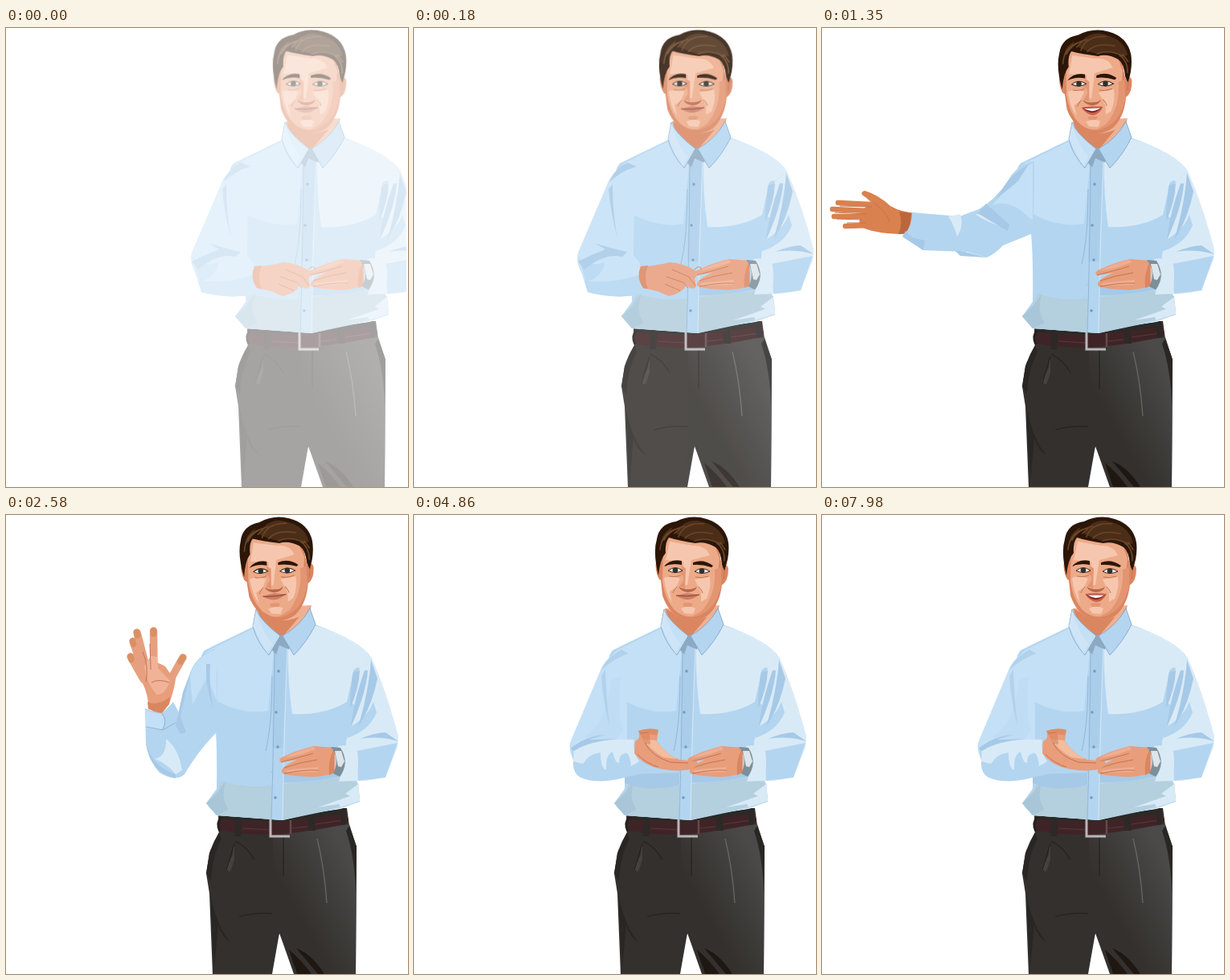
Write an HTML page that moves like this. It is 500 px wide and 570 px high and loops after 8 s.

```html
<!DOCTYPE html>
<html lang="en">
<head>
<meta charset="utf-8">
<title>Presenter</title>
<style>
  html, body { margin: 0; width: 100%; height: 100%; overflow: hidden; background: #fff; }
  svg { display: block; width: 500px; height: 570px; clip-path: inset(0 2px 0 0); }
  .base { fill: #b3d5f0; }
  .soft { fill: #c4e0f6; }
  .pale { fill: #d9eaf7; }
  .fold { fill: #a6c9e7; }
  .skin { fill: #e89d7b; }
  .shade { fill: #da8661; }
  .glow { fill: #f6c7ae; }
  .hair { fill: #2b1608; }
  .lock { fill: none; stroke: #6b4527; stroke-width: 1.6; stroke-linecap: round; }
  .crease { fill: none; stroke: #c47553; stroke-width: 1; }
  .seam { fill: none; stroke: #8db3d3; stroke-width: .9; }
  .finger { fill: none; stroke: #e6a080; stroke-width: 9.5; stroke-linecap: round; }
</style>
</head>
<body>
<svg viewBox="0 0 500 570">
<defs>
  <linearGradient id="cloth" x1="0" y1="1" x2="1" y2="0">
    <stop offset=".35" stop-color="#33302d"/><stop offset=".85" stop-color="#4b4a48"/>
  </linearGradient>
</defs>
<g id="man">
  <g id="trousers">
    <path fill="#34302e" d="M264 374L330 378 424 364 427 386 436 412 435 570 358 570 340 519 331 570 257 570 253 470 249 445 253 420Q257 407 265 394Z"/>
    <path fill="url(#cloth)" d="M332 397L427 384 436 412 435 570 394 570 362 540 354 553 340 519 331 550Z"/>
    <path fill="#1f1712" d="M352 540Q367 552 380 570L362 570ZM361 538Q380 545 396 570L388 570Z"/>
    <path fill="#292623" d="M254 470Q262 512 280 531Q267 524 264 508L259 565ZM427 386L436 412 435 470Q434 425 423 392ZM265 394L268 402Q256 425 255 455L249 445 253 420Z"/>
    <path fill="#45413f" d="M284 406L282 422 273 440 279 443 284 428Z"/>
    <path fill="none" stroke="#211e1c" d="M285 405Q300 412 309 428M345 399L345 448M290 499Q310 493 331 495M284 408L274 441"/>
    <path fill="none" stroke="#696765" stroke-width="1.3" d="M387 402Q396 438 399 482"/>
    <path fill="#3f2427" d="M265 376Q300 382 330 380L421 371Q428 376 424 383Q385 393 331 397Q290 397 264 391Z"/>
    <path fill="none" stroke="#5b3838" d="M294 389L328 391M355 389L375 387M385 384L420 379"/>
    <path fill="#2c2927" d="M264 373L330 378 424 364 423 371Q370 378 330 381L266 378ZM286 376h8l-2 23h-8ZM375 370h8l2 22h-8ZM415 365l7-1 1 20-6 1Z"/>
    <path fill="none" stroke="#242120" stroke-width="3" d="M268 375Q261 382 266 393"/>
    <path fill="none" stroke="#b9b6bb" stroke-width="3" d="M329 378V399H353"/>
    <path fill="none" stroke="#64494a" stroke-width="2.5" d="M354 396V379"/>
  </g>

  <g id="shirt">
    <path class="base" d="M309 138L247 168Q235 182 250 208Q264 235 262 340L249 358 262 373 344 379 420 363 440 356 437 333 425 290 455 178Q440 156 384 136L343 158Z"/>
    <path class="soft" d="M309 140L252 168Q238 182 250 205L262 231Q296 249 326 243L333 172Z"/>
    <path class="pale" d="M384 137Q441 155 455 178L440 190Q431 187 430 205L424 232Q396 249 356 247Q350 205 351 165Z"/>
    <path fill="#b4cfdd" d="M268 330Q298 340 330 336L412 327 438 333 440 352 400 366 344 379 262 373 249 358 262 345Z"/>
    <path fill="#a9c6d8" d="M262 345L274 330Q266 352 277 366L262 373 249 358Z"/>
    <path class="fold" d="M329 318L412 320 414 325Q375 333 340 332Z"/>
    <path class="pale" d="M438 334L422 346 428 349 388 363 414 359 416 363 440 355Z"/>
    <path class="base" d="M334 168L350 164Q346 250 344 379L330 378Q332 270 334 168Z"/>
    <path class="fold" d="M334 165L350 162 344 290 331 290Z" opacity=".6"/>
    <path class="seam" d="M334 167Q333 290 330 378M331 200Q331 260 323 293"/>
    <path d="M350 166Q346 260 344 379" fill="none" stroke="#d5e7f6"/>
    <g fill="#6c9bc1"><circle cx="339" cy="194" r="1.7"/><circle cx="336" cy="245" r="1.7"/><circle cx="338" cy="288" r="1.7"/><circle cx="335" cy="351" r="1.7"/></g>
    <path class="pale" d="M455 178Q474 221 488 275L487 288 472 325Q455 331 434 330L423 287 422 260 440 190Z"/>
    <path class="base" d="M436 293L487 283 472 326 438 330ZM422 286L421 262 425 230 434 236 430 262Q450 250 457 232L461 245Q452 268 424 277Z"/>
    <path class="fold" d="M432 195L440 193Q439 216 428 240Q428 215 432 195ZM446 193L450 193Q448 222 429 263Q432 232 446 193ZM454 180L462 203Q455 238 438 263Q451 220 454 180ZM440 278Q460 270 472 270L488 281Q464 274 440 278Z"/>
    <path class="pale" d="M413 287Q427 284 437 294Q440 318 434 330L414 331 416 325Q426 308 413 287Z"/>
    <path fill="#eeb092" d="M312 116L380 112 375 130 342 154 318 136Z"/>
    <path class="shade" d="M312 116L320 120Q340 138 365 126L350 144 342 153 320 136ZM379 113L375 131 366 136Z"/>
    <path fill="#8da9c1" d="M342 148L329 165 336 173 340 162 352 167 355 160Z"/>
    <path class="soft" stroke="#86a9c8" stroke-width=".9" d="M311 117Q316 131 341 150L327 174Q312 158 307 138Z"/>
    <path class="base" stroke="#86a9c8" stroke-width=".9" d="M378 116L385 136Q374 158 358 174L344 150Q367 137 378 116Z"/>
    <path class="pale" d="M311 118L307 138 325 171 331 160Q316 142 311 118Z" opacity=".55"/>
  </g>

  <g id="watchHand">
    <path class="skin" d="M409 289L383 287Q364 291 343 301Q338 304 342 307L362 304Q345 311 343 317Q342 321 347 322Q366 326 386 325Q399 324 409 320Z"/>
    <path fill="#efae90" d="M383 288Q364 292 344 302L365 298 385 291ZM347 317Q370 314 389 313L388 319 350 320Z"/>
    <path class="crease" d="M342 307Q365 301 382 296M346 314Q365 307 387 304M346 321Q370 316 389 317"/>
    <path class="shade" d="M408 290Q400 305 402 323L408 320Z"/>
    <path fill="#7d8f99" d="M404 288L416 289Q428 308 415 325L407 321Q416 303 404 288Z"/>
    <path fill="#dde5e9" d="M409 293L417 293 421 306 417 313 413 312Z"/>
  </g>

  <g id="armClasp">
    <path class="soft" d="M256 167Q237 178 231 195L195 279Q192 292 199 303L207 328Q240 337 273 331L272 292 264 282 265 205Z"/>
    <path class="base" d="M196 285Q210 298 228 291Q225 310 205 315ZM273 331Q240 337 207 328L203 314Q240 318 273 306Z"/>
    <path class="fold" d="M256 167Q240 175 234 192Q247 178 268 172ZM195 290Q213 281 229 275L216 267Q233 273 256 278L250 284Q228 279 203 300ZM233 200Q235 225 244 262Q238 230 238 194Z"/>
    <path class="skin" d="M273 296Q290 296 309 291Q326 292 341 301Q346 306 340 311L342 321Q337 327 330 319Q325 329 308 333Q292 325 276 323Q267 310 273 296Z"/>
    <path class="shade" d="M273 296L282 295Q276 309 282 324L276 323Q267 310 273 296Z"/>
    <path class="crease" d="M312 300L333 309 341 320M305 309L326 316 332 323M303 318L322 326M340 300Q346 293 349 300"/>
  </g>

  <g id="armPoint">
    <path fill="#d9814f" d="M118 230Q99 229 85 221Q70 207 53 202Q45 205 54 210L62 217 48 227 46 246Q64 255 97 256L116 255Z"/>
    <path class="finger" style="stroke:#d9814f;stroke-width:6.5" d="M60 219L20 217M57 227L13 225M57 234L15 234M60 245L29 246"/>
    <path class="crease" d="M62 222L22 221M55 231L16 229M50 238L18 237M55 242L31 242M64 217Q80 228 84 240"/>
    <path fill="#bc663c" d="M111 230L96 228Q101 242 95 256L108 255Z"/>
    <path class="base" d="M264 165Q240 172 231 190Q215 214 195 225L171 234 112 229Q112 248 100 259L126 276 180 278 205 285Q216 280 225 270L262 255 264 200Z"/>
    <path class="soft" d="M262 168Q246 174 240 186L212 220Q235 212 258 236L262 238Z"/>
    <path class="pale" d="M157 234L172 231Q177 245 168 259Q164 244 157 234ZM190 231L203 232 222 246Q207 242 190 231Z"/>
    <path class="fold" d="M104 252L112 260 128 264 126 276 100 259ZM165 276L178 278 205 285 172 283ZM204 218L233 244 231 252Q210 240 194 230ZM231 190Q240 180 258 168L244 190 216 213Z"/>
  </g>

  <g id="armWave">
    <path class="skin" d="M177 240Q178 224 168 205L168 184Q184 179 198 188L205 198 212 196Q210 216 203 234L192 250Z"/>
    <path class="base" d="M260 166Q238 175 231 191L215 245 208 232Q198 243 194 246Q183 245 173 240L174 285Q180 309 191 320Q211 332 222 322Q241 290 262 270L263 200Z"/>
    <path class="soft" d="M261 167Q235 176 229 200L232 235 250 202 262 230V190ZM174 242Q184 247 193 247Q200 255 194 266L174 264Z"/>
    <path class="pale" d="M199 278Q215 290 219 317L211 322Q200 308 185 303Q200 300 199 278Z"/>
    <path class="fold" d="M231 191Q223 220 217 250L224 270 217 272 211 262 220 220ZM249 185Q248 215 258 240Q252 215 254 185ZM174 283Q182 313 211 322L211 327Q179 320 174 283Z"/>
    <path class="seam" d="M194 246Q201 255 195 267L174 263M195 267L211 258"/>
    <path class="finger" d="M184 192L183.500 144M175 192L163 146M172 197L158 157M171 204L155 176"/>
    <path class="finger" d="M202 209L220 177"/>
    <path class="finger" style="stroke:#d99063;stroke-width:7.500" d="M183.500 143.500v4M162.500 145.500l1 4M157.500 156.500l1 4M155 175.500l1 4M220 177l-3 5"/>
    <path fill="#f0b398" d="M172 188L180 175 188 176 189 190 204 206Q198 224 187 223Q176 211 172 188Z"/>
    <path class="shade" d="M176 232Q188 238 204 226L203 235 193 246 177 241Z"/>
    <path class="crease" d="M179 160L180 192M170 170Q178 188 174 207M181 208Q190 203 203 208"/>
  </g>

  <g id="armRest">
    <path class="fold" d="M262 322L330 320V335Q294 345 262 333Z"/>
    <path class="soft" d="M258 166Q237 178 231 195L194 283Q192 293 200 308L250 312 265 285 265 205Z"/>
    <path class="base" d="M257 200Q252 240 260 268L250 280 212 276Q238 260 246 205Z" opacity=".4"/>
    <path class="fold" d="M258 167Q238 178 233 193Q247 179 267 172ZM233 200Q234 225 243 261Q239 225 238 192Z" opacity=".6"/>
    <g id="forearm">
      <path class="base" d="M195 289Q216 274 255 281L275 278Q272 300 296 314L293 319 262 326Q228 335 207 326Q197 320 198 305Z"/>
      <path class="pale" d="M199 290Q225 276 274 279Q271 293 280 306L270 312Q268 293 262 296Q255 297 255 308Q250 308 247 294Q238 297 239 317Q232 314 232 295Q218 296 210 309L198 306Z"/>
      <path class="fold" d="M195 290Q212 275 237 273L217 279 255 278Q217 281 199 293Z"/>
      <path class="skin" d="M275 281Q283 277 279 268Q295 263 304 267L302 281Q315 299 331 304L352 306Q355 311 344 316Q322 320 298 313Q282 307 274 296Z"/>
      <path fill="#f3bd9e" d="M285 278L301 280Q313 296 327 303L310 301Q293 291 285 278Z"/>
      <path class="shade" d="M279 268Q293 264 304 267L302 273 293 272 294 285 288 284Z" opacity=".7"/>
      <path class="crease" d="M281 271L291 270M287 283Q296 300 319 307L341 308M278 297Q289 309 304 313"/>
    </g>
  </g>

  <g id="head">
    <path class="shade" d="M306 55Q299 56 301 68Q303 80 307 81L309 100Q317 123 336 130Q351 134 365 125Q380 112 383 87Q391 82 391 67Q390 60 383 64L378 34 318 25Z"/>
    <path fill="#edaa89" d="M310 45L309 82Q312 105 324 118Q341 133 359 121Q372 107 377 82L380 54 374 37 318 27Z"/>
    <path class="glow" d="M318 33L347 38Q362 37 368 50L345 56 340 87 335 87 335 58 313 56ZM311 78Q321 74 331 79L326 90 318 95 321 109Q313 98 311 78ZM349 80L368 77Q370 90 364 104L357 108 357 96ZM332 116Q342 111 350 116L347 123 336 122Z"/>
    <path fill="#e39572" d="M374 68Q376 98 358 119L344 127Q374 124 382 88L382 65ZM333 63L330 73Q336 74 335 81L330 89 337 91 338 66ZM334 110Q341 108 347 110L345 114 336 114Z"/>
    <path fill="#b9684a" d="M329 89Q335 93 341 92Q347 93 352 89Q350 95 341 96Q332 95 329 89Z"/>
    <path class="crease" d="M327 89Q323 93 322 97M354 89Q358 93 359 97M387 66L385 79M317 76Q325 78 332 75M350 77Q358 79 366 76"/>
    <path class="hair" d="M304 75Q297 47 302 30Q305 11 326 8Q345-1 364 5Q387 12 391 34Q393 51 386 69L383 62Q382 45 375 40Q362 32 350 35Q330 32 317 28Q312 35 313 47Q306 55 304 75Z"/>
    <path fill="#4b2e17" d="M326 23Q334 6 352 7Q382 12 387 35L380 37Q368 27 350 32Q338 30 326 23ZM307 36Q308 22 322 15L313 29Z"/>
    <path class="lock" d="M306 43Q308 22 327 17M311 31Q318 18 337 14M329 27Q336 9 360 11M337 29Q346 18 371 23M349 32Q364 27 381 36M376 34Q387 42 386 57M381 34L387 43M324 23L332 15"/>
    <g id="brows" class="hair">
      <path d="M311 64Q319 54 333 57L333 62Q321 59 311 64Z"/><path d="M347 62L347 59Q360 54 372 63L370 65Q358 61 347 62Z"/>
    </g>
    <g id="eyes">
      <path fill="#f0ece6" stroke="#3d261b" d="M316 69Q325 62 334 69Q325 74 316 69ZM349 70Q358 63 368 70Q358 75 349 70Z"/>
      <g fill="#30302c"><circle cx="325" cy="68.500" r="3.300"/><circle cx="358" cy="69.500" r="3.300"/></g>
    </g>
    <path id="lids" class="shade" stroke="#3d261b" d="M317 70Q325 64 333 70Q325 73 317 70ZM350 71Q358 65 367 71Q358 74 350 71Z"/>
    <g id="closed">
      <path fill="#cd7d66" d="M326 100Q334 98 340 97Q347 98 355 99Q347 105 340 105Q333 105 326 100Z"/>
      <path fill="none" stroke="#8a4234" d="M326 100Q340 102 355 99"/>
    </g>
    <g id="open">
      <path fill="#c9614d" d="M327 98Q335 97 340 97Q347 97 354 98Q349 108 341 108Q333 107 327 98Z"/>
      <path fill="#7c241c" d="M329 99H352Q347 105 340 105Q333 104 329 99Z"/>
      <path fill="#fff" d="M330 99.500H351Q346 103 340 103Q335 102 330 99.500Z"/>
    </g>
  </g>
</g>
</svg>
<script>
const LOOP = 8000, STEP = 30;
const part = id => document.getElementById(id);
const show = (id, on) => part(id).style.display = on ? "" : "none";
const move = (id, transform) => part(id).setAttribute("transform", transform);
const ramp = (t, from, to) => {
  const p = Math.min(1, Math.max(0, (t - from) / (to - from)));
  return p * p * (3 - 2 * p);
};
const bump = (t, from, to) => Math.sin(Math.PI * ramp(t, from, to));

// The mouth switches between closed and open at these times.
const mouthFlips = [
  750, 900, 990, 1140, 1260, 1500, 1620, 1800, 2700, 2850, 2970, 3150, 3270,
  3600, 3720, 3900, 4020, 4140, 4290, 4440, 4560, 4740, 5040, 5160, 5310, 5430,
  5580, 5700, 5850, 6000, 6150, 6450, 6540, 6660, 6900, 7740, 7890
];
const blinks = [4500, 5310, 7320];
const arms = [["armClasp", 0], ["armPoint", 600], ["armWave", 2430], ["armRest", 3600], ["", LOOP]];

function draw(t) {
  const entry = Math.min(8, t / STEP);
  move("man", `translate(${36 - 4.5 * entry})`);
  part("man").style.opacity = 0.44 + 0.07 * entry;

  const lean = 0.65 + 0.35 * ramp(t, 540, 1320) + 0.5 * ramp(t, 1350, 1830) - 1.5 * ramp(t, 2580, 3300);
  move("head", `translate(${-3 * lean}) rotate(${-2 * lean} 345 140)`);

  for (let i = 0; i < arms.length - 1; i++) show(arms[i][0], t >= arms[i][1] && t < arms[i + 1][1]);
  move("armPoint", `rotate(${-56 * (1 - ramp(t, 570, 960))} 248 195)`);
  const swing = -35 * (1 - ramp(t, 3570, 3900));
  const nod = bump(t, 4200, 4740) + bump(t, 5820, 6330) + bump(t, 7710, 7950);
  move("forearm", `rotate(${swing - 4 * nod} 207 308)`);

  const talking = mouthFlips.filter(time => time <= t).length % 2 === 1;
  show("open", talking);
  show("closed", !talking);
  const blinking = blinks.some(time => t >= time && t < time + 90);
  show("lids", blinking);
  show("eyes", !blinking);
  move("brows", `translate(0 ${-1.2 * (bump(t, 4200, 4740) + bump(t, 5010, 5700))})`);
}

function tick() {
  draw(Math.floor(performance.now() % LOOP / STEP) * STEP);
  requestAnimationFrame(tick);
}
tick();
</script>
</body>
</html>
```
